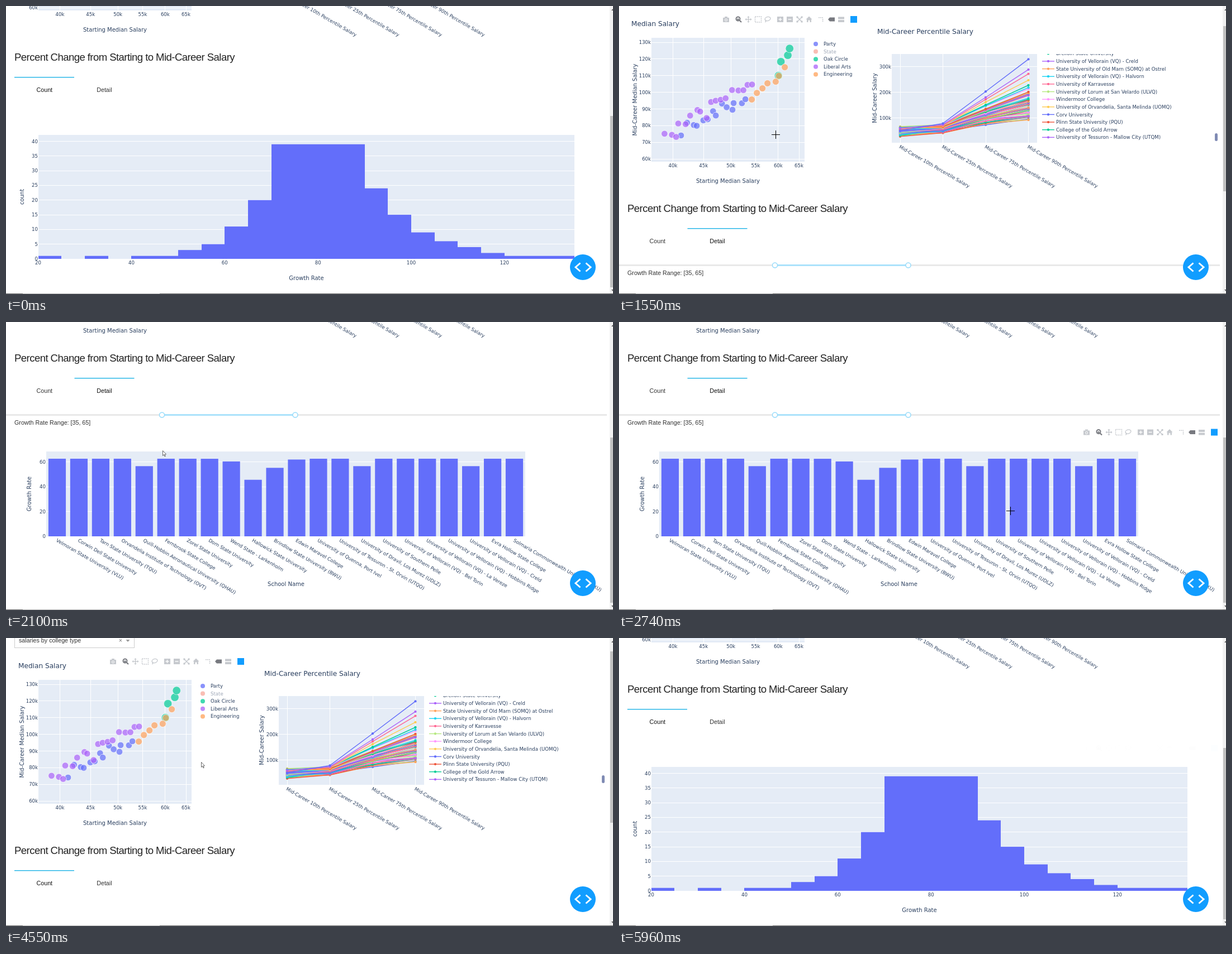
An HTML page with a canvas that plays this animation: 1086 by 516 pixels, repeating every 6.02 s.

```html
<!DOCTYPE html>
<html lang="en">
<head>
<meta charset="utf-8">
<title>Salary dashboard</title>
<style>
html, body { margin: 0; width: 100%; height: 100%; overflow: hidden; background: #fff; }
canvas { display: block; width: 1086px; height: 516px; }
</style>
</head>
<body>
<canvas id="stage" width="1086" height="516"></canvas>
<script>
const ctx = document.getElementById('stage').getContext('2d');
const W = 1086, HEIGHT = 516, LOOP = 6020;
const PALETTE = ['#636efa', '#ef553b', '#00cc96', '#ab63fa', '#ffa15a',
  '#19d3f3', '#ff6692', '#b6e880', '#ff97ff', '#fecb52'];
const INK = '#2a3f5f', PLOT = '#e5ecf6', BLUE = PALETTE[0];
const CHART = '"DejaVu Sans", Verdana, sans-serif';
const BODY = '"Liberation Sans", Arial, sans-serif';
const TICK = 8.57, AXIS = 10, TITLE = 12.14, UI = 10.71;

const SCHOOLS = ['Velmoran State University (VLU)', 'Corwin Dell State University',
  'Tarn State University (TQU)', 'Orvandelia Institute of Technology (OVT)',
  'Quill-Hobbin Aeronautical University (QHAU)', 'Fernbrook State College', 'Zorel State University',
  'Dorn State University', 'Wend State - Larkenholm', 'Hallowick State University',
  'Brindlow State University (BWU)', 'Edwin Maravel College', 'University of Quenna, Port Ivel',
  'University of Tessuron - St. Orvin (UTQO)', 'University of Dravil, Los Murez (UDLZ)',
  'University of Southern Pelle', 'University of Vellorain (VQ) - Bel Torin',
  'University of Vellorain (VQ) - La Vereze', 'University of Vellorain (VQ) - Hobbins Ridge',
  'University of Vellorain (VQ) - Creld', 'Evra Hollow State College',
  'Solmaria Commonwealth University (SXU)'];
const LEGEND = ['Brelloin State University', 'University of Vellorain (VQ) - Creld',
  'State University of Old Marn (SOMQ) at Ostrel', 'University of Vellorain (VQ) - Halvorn',
  'University of Karravesse', 'University of Lorum at San Velardo (ULVQ)', 'Windermoor College',
  'University of Orvandelia, Santa Melinda (UOMQ)', 'Corv University', 'Plinn State University (PQU)',
  'College of the Gold Arrow', 'University of Tessuron - Mallow City (UTQM)'];

const clamp = v => Math.max(0, Math.min(1, v));
const mix = (a, b, p) => a + (b - a) * p;
const smooth = v => v * v * (3 - 2 * v);
const cubic = p => p < 0.5 ? 4 * p ** 3 : 1 - (2 - 2 * p) ** 3 / 2;
const ramp = (t, from, to) => clamp((t - from) / (to - from));
const fade = (t, on, off) => smooth(ramp(t, on, on + 300)) * (1 - smooth(ramp(t, off, off + 300)));
const times = (n, make) => Array.from({ length: n }, (_, i) => make(i));

let seed = 7;
const random = () => (seed = (seed * 16807) % 2147483647) / 2147483647;
const jitter = size => (random() - 0.5) * size;

// Points scattered around a straight trend
const cloud = (n, [x0, x1], [y0, y1], spread) => times(n, i => {
  const p = i / (n - 1);
  return [mix(x0, x1, p) + jitter(8), mix(y0, y1, p) + jitter(spread)];
});
const GROUPS = [
  { name: 'Party', color: BLUE, r: 5.8, points: cloud(14, [115, 225], [222, 166], 26) },
  { name: 'State', color: PALETTE[1], faded: true, points: [] },
  { name: 'Oak Circle', color: PALETTE[2], r: 7.3, points: cloud(4, [282, 308], [116, 82], 24) },
  { name: 'Liberal Arts', color: PALETTE[3], r: 5.8, points: cloud(18, [82, 238], [236, 136], 30) },
  { name: 'Engineering', color: PALETTE[4], r: 6, points: cloud(7, [234, 300], [170, 112], 14) }
];

// Four percentile heights per school; only the best few pull away from the bundle
const percentileX = i => 503 + 76.5 * i;
const SERIES = times(51, i => {
  const u = i / 50, star = u ** 16;
  return [
    234 - 18 * u + 6 * star + jitter(5), 227 - 13 * u - 4 * star + jitter(5),
    211 - 30 * u - 25 * star + jitter(6), 205 - 55 * u - 52 * star + jitter(6)
  ];
});

// A flat top of four bins with an exponential slope on each side
const COUNTS = times(23, i => {
  const d = i - 11.5, slope = d < 0 ? 0.66 : 0.48;
  const bell = 39.4 * Math.exp(-slope * Math.max(0, Math.abs(d) - 1.5));
  return Math.max(1 - i % 2, Math.round(bell));
});
const growth = i => 62.5 - (i % 5 === 4 ? 6 : 0) - 12 * Math.exp(-((i - 9.3) ** 2));

function rect(x, y, w, h, color) { ctx.fillStyle = color; ctx.fillRect(x, y, w, h); }

function dot(x, y, r, fill, stroke, width = 1) {
  ctx.beginPath();
  ctx.arc(x, y, r, 0, 7);
  ctx.fillStyle = fill;
  ctx.fill();
  if (stroke) { ctx.strokeStyle = stroke; ctx.lineWidth = width; ctx.stroke(); }
}

function path(points, { stroke, fill, width = 1, close = false }) {
  ctx.beginPath();
  points.forEach(([x, y]) => ctx.lineTo(x, y));
  if (close) ctx.closePath();
  if (fill) { ctx.fillStyle = fill; ctx.fill(); }
  if (stroke) { ctx.strokeStyle = stroke; ctx.lineWidth = width; ctx.stroke(); }
}

// y is the middle of the capital letters
function text(str, x, y, size, { align = 'left', color = INK, font = CHART, spacing = 0 } = {}) {
  ctx.font = `${size}px ${font}`;
  ctx.letterSpacing = spacing + 'px';
  ctx.textAlign = align;
  ctx.fillStyle = color;
  ctx.fillText(str, x, y + size * 0.36);
}

function at(x, y, draw, degrees = 0) {
  ctx.save();
  ctx.translate(x, y);
  ctx.rotate(degrees * Math.PI / 180);
  draw();
  ctx.restore();
}

const slanted = (str, x, y) => at(x, y, () => text(str, 0, -TICK * 0.36, TICK), 30);
const upright = (str, x, y) => at(x, y, () => text(str, 0, 0, AXIS, { align: 'center' }), -90);
const centered = (str, x, y, size) => text(str, x, y, size, { align: 'center' });

function yAxis(left, width, n, label, y0, step) {
  for (let i = 0; i < n; i++) {
    const y = y0 - step * i;
    rect(left, Math.round(y - 0.5), width, 1, '#fff');
    text(label(i), left - 1, y, TICK, { align: 'right' });
  }
}

function modebar(right, y, alpha) {
  if (alpha <= 0) return;
  const pale = '#c6c9ce', dark = '#77797f';
  const plus = (x, r, color) => { rect(x - r, -0.7, 2 * r, 1.4, color); rect(x - 0.7, -r, 1.4, 2 * r, color); };
  const icons = {
    camera() { rect(186, -3, 11, 8, pale); rect(189, -5, 5, 2, pale); dot(191.5, 1, 2, pale, '#fff'); },
    zoom() { dot(213, -1, 3.5, '#fff', dark, 2); path([[216, 2], [219, 5]], { stroke: dark, width: 2.2 }); plus(213, 2, dark); },
    pan() {
      plus(231.5, 5, pale);
      for (let a = 0; a < 360; a += 90) at(231.5, 0, () => path([[6, 0], [3.5, -2.3], [3.5, 2.3]], { fill: pale }), a);
    },
    select() {
      ctx.setLineDash([2, 1.3]);
      ctx.strokeStyle = pale; ctx.lineWidth = 1.4; ctx.strokeRect(243.5, -5, 11, 10);
      ctx.setLineDash([]);
    },
    lasso() {
      ctx.beginPath(); ctx.ellipse(266, -1, 5, 3.5, -0.3, 0, 7); ctx.stroke();
      path([[262, 1], [263, 3], [261.5, 5]], { stroke: pale, width: 1.4 });
    },
    zoomSteps() {
      for (const x of [283, 300]) rect(x, -5, 11, 10, pale);
      plus(288.5, 3, '#fff'); rect(302.5, -0.7, 6, 1.4, '#fff');
    },
    autoscale() {
      for (const s of [-1, 1]) {
        path([[323 - 5 * s, -5], [323 + 5 * s, 5]], { stroke: pale, width: 1.5 });
        for (const v of [-5.5, 2.5]) rect(321.5 + 4 * s, v, 3, 3, pale);
      }
    },
    home() {
      path([[334.5, 0], [340, -5.5], [345.5, 0]], { fill: pale });
      for (const x of [336, 341.5]) rect(x, 0, 2.5, 5, pale);
      rect(336, 0, 8, 1.5, pale);
    },
    hover() {
      for (const x of [357, 360, 363]) rect(x, -4, 2, 1.5, pale);
      for (const v of [-1, 2]) rect(363.8, v, 1.5, 2, pale);
      path([[374, 0], [377, -3.5], [386, -3.5], [386, 3.5], [377, 3.5]], { fill: dark });
      for (const v of [-4.5, 1]) rect(392, v, 11, 4, pale);
    },
    badge() { rect(414, -6, 12, 12, '#119dff'); }
  };
  ctx.globalAlpha = alpha;
  at(right - 420, y, () => Object.values(icons).forEach(draw => draw()));
  ctx.globalAlpha = 1;
}

function dropdown() {
  rect(15, 0, 215, 1, '#ccc');
  for (const x of [15, 229]) rect(x, -30, 1, 30, '#ccc');
  text('salaries by college type', 23, -12.5, UI, { font: BODY, color: '#333' });
  text('×', 205, -12.5, UI, { font: BODY, color: '#777', align: 'center' });
  path([[214.5, -14], [221.5, -14], [218, -10]], { fill: '#999' });
}

function scatter(bar) {
  text('Median Salary', 22, 33, TITLE);
  rect(58, 58, 274, 222, PLOT);
  for (let k = 40; k <= 65; k += 5) {
    const x = 96.5 + 464.5 * Math.log(k / 40);
    rect(Math.round(x - 0.5), 58, 1, 222, '#fff');
    centered(k + 'k', x, 286.5, TICK);
  }
  yAxis(58, 274, 8, i => 60 + 10 * i + 'k', 275, 29.85);
  centered('Starting Median Salary', 195, 314, AXIS);
  upright('Mid-Career Median Salary', 28, 169);
  GROUPS.forEach(({ name, color, r, faded, points }, i) => {
    const y = 69 + 13.6 * i;
    ctx.globalAlpha = 0.7;
    points.forEach(([px, py]) => dot(px, py, r, color, '#fff'));
    ctx.globalAlpha = faded ? 0.38 : 0.75;
    dot(352, y, 4, color);
    ctx.globalAlpha = faded ? 0.45 : 1;
    text(name, 366, y, TICK);
    ctx.globalAlpha = 1;
  });
  modebar(420, 25, bar);
}

function percentiles() {
  text('Mid-Career Percentile Salary', 462, 47, TITLE);
  rect(488, 87, 260, 159, PLOT);
  ['10th', '25th', '75th', '90th'].forEach((rank, i) => {
    rect(Math.round(percentileX(i) - 0.5), 87, 1, 159, '#fff');
    slanted(`Mid-Career ${rank} Percentile Salary`, percentileX(i) - 2.5, 255);
  });
  yAxis(488, 260, 3, i => 100 * (i + 1) + 'k', 201.5, 46);
  upright('Mid-Career Salary', 457, 166);
  SERIES.forEach((heights, n) => {
    const color = PALETTE[n * 7 % 10], points = heights.map((y, i) => [percentileX(i), y]);
    path(points, { stroke: color, width: 1.45 });
    points.forEach(([x, y]) => dot(x, y, 2.15, color));
  });

  ctx.save();
  ctx.beginPath(); ctx.rect(750, 87, 320, 160); ctx.clip();
  LEGEND.forEach((name, i) => {
    const y = 86.3 + 13.64 * i, color = PALETTE[(i + 2) % 10];
    rect(757, y - 0.7, 22, 1.4, color);
    dot(768, y, 2.15, color);
    text(name, 782, y, TICK);
  });
  ctx.restore();
  ctx.fillStyle = '#808bb4';
  ctx.beginPath(); ctx.roundRect(1066, 229, 5, 14, 2.5); ctx.fill();
}

function heading(detail) {
  text('Percent Change from Starting to Mid-Career Salary', 15, 0, 18.57,
    { font: BODY, color: '#222', spacing: -0.571 });
  rect(detail ? 122.5 : 15, 36, 107, 1.4, '#1eb3e6');
  ['Count', 'Detail'].forEach((label, i) => text(label, 68.8 + 107.1 * i, 59.5, UI,
    { font: BODY, align: 'center', color: i === +detail ? '#111' : '#333' }));
}

function countChart(bar) {
  rect(58, 231, 959, 222, PLOT);
  yAxis(58, 959, 9, i => 5 * i + '', 453, 26.32);
  const edge = i => Math.round(57.5 + 41.72 * i);
  COUNTS.forEach((n, i) => rect(edge(i), 453 - 5.263 * n, edge(i + 1) - edge(i), 5.263 * n, BLUE));
  for (let v = 20; v <= 120; v += 20) centered(v + '', 57.5 + 8.344 * (v - 20), 459.5, TICK);
  centered('Growth Rate', 537.5, 487, AXIS);
  upright('count', 28, 342);
  modebar(1065, 197.5, bar);
}

function detailChart(bar) {
  rect(0, 165, 1075, 3, '#e9e9e9');
  rect(279, 165, 238, 3, '#abe2fb');
  for (const x of [279, 517.5]) dot(x, 166.5, 4.5, '#fff', '#96dbfa', 1.5);
  text('Growth Rate Range: [35, 65]', 15, 180, UI, { font: BODY, color: '#333' });
  rect(72, 232, 857, 152, PLOT);
  yAxis(72, 857, 4, i => 20 * i + '', 384, 44.5);
  SCHOOLS.forEach((name, i) => {
    const x = 72 + 38.955 * (i + 0.5), h = 2.225 * growth(i);
    rect(x - 15.6, 384 - h, 31.2, h, BLUE);
    slanted(name, x - 2.5, 393);
  });
  centered('School Name', 501, 469.5, AXIS);
  upright('Growth Rate', 41.5, 308);
  modebar(1065, 197.5, bar);
}

function chrome(H, detail) {
  dot(1032, 468, 23, '#119dff');
  for (const s of [-1, 1]) {
    path([-7.5, 0, 7.5].map(v => [1032.5 + s * (v ? 5 : 13.5), 468 + v]), { stroke: '#fff', width: 2.9 });
  }
  rect(1080, 0, 6, HEIGHT, '#f1f1f1');
  const length = detail ? 296 : 307;
  const top = detail ? 207 - (H - 64) * 0.575 : 197 - (H - 91) * 0.5986;
  rect(1081, Math.round(top), 5, length, '#c1c1c1');
  path([[1083, 8], [1086, 5], [1086, 8]], { fill: '#555' });
  path([[1083, 508], [1086, 511], [1086, 508]], { fill: '#555' });
  rect(0, 515, W, 1, '#666');
  rect(30, 515, 245, 1, '#b5b5b5');
}

const MOVES = [
  { from: 80, to: 760, x: 186, y: 158 },
  { from: 1020, to: 1440, x: 280, y: 230 },
  { from: 2100, to: 2740, x: 700, y: 338 },
  { from: 2970, to: 3630, x: 97, y: 103 },
  { from: 3650, to: 3810, x: 75, y: 120 },
  { from: 4060, to: 4500, x: 349, y: 222 },
  { from: 4760, to: 5300, x: 960, y: 400 },
  { from: 5300, to: 5900, x: 1070, y: 525 }
];

function cursor(t, H, detail) {
  let x = 1010, y = 525;
  for (const move of MOVES) {
    const p = smooth(ramp(t, move.from, move.to));
    x = mix(x, move.x, p);
    y = mix(y, move.y, p);
  }
  const inside = (l, top, r, bottom) => x > l && x < r && y > H + top && y < H + bottom;
  const overPlot = inside(58, -305, 332, -83) || inside(488, -276, 748, -117) ||
    (detail ? inside(72, 169, 929, 320) : inside(58, 140, 1017, 362));
  const overButton = Math.hypot(x - 1032, y - 468) < 23;

  at(Math.round(x), Math.round(y), () => {
    if (overButton || inside(15, 36, 230, 85)) {
      path([[-1, 8], [-1, 1], [0, 0], [1, 1], [1, 5], [6, 7], [6, 11], [5, 14], [-1, 14], [-4, 10], [-4, 8]],
        { fill: '#fff', stroke: '#333', close: true });
      for (const u of [2, 4]) path([[u, 6], [u, 9]], { stroke: '#555', width: 0.7 });
    } else if (overPlot) {
      rect(-7, 0, 15, 1, '#000');
      rect(0, -7, 1, 15, '#000');
    } else {
      path([[0.5, 0.5], [0.5, 9.5], [2.5, 7.5], [4, 11], [5.3, 10.4], [3.8, 7.2], [6.5, 7]],
        { fill: '#fff', stroke: '#444', width: 0.8, close: true });
    }
  });
}

// Switching tabs empties the page, which throws the scroll position up; the wheel then brings it back.
const TOP = 380;
function headingY(t) {
  if (t < 990) return 91;
  const y = t < 4040 ? mix(TOP, 64, cubic(ramp(t, 1487, 1750))) : mix(TOP, 91, cubic(ramp(t, 4550, 4745)));
  return Math.round(y);
}

function draw(t) {
  const H = headingY(t), detail = t >= 990 && t < 4040;
  rect(0, 0, W, HEIGHT, '#fff');
  at(0, H - 363, () => {
    dropdown();
    scatter(fade(t, 1000, 1620) + fade(t, 4060, 4650));
    percentiles();
  });
  at(0, H, () => heading(detail));
  if (detail) at(0, H - 64, () => detailChart(fade(t, 2100, 3280)));
  else at(0, H - 91, () => countChart(fade(t, 100, 560) + fade(t, 4760, 5680)));
  chrome(H, detail);
  cursor(t, H, detail);
}

const start = performance.now();
function tick() {
  draw((performance.now() - start) % LOOP);
  requestAnimationFrame(tick);
}
tick();
</script>
</body>
</html>
```
